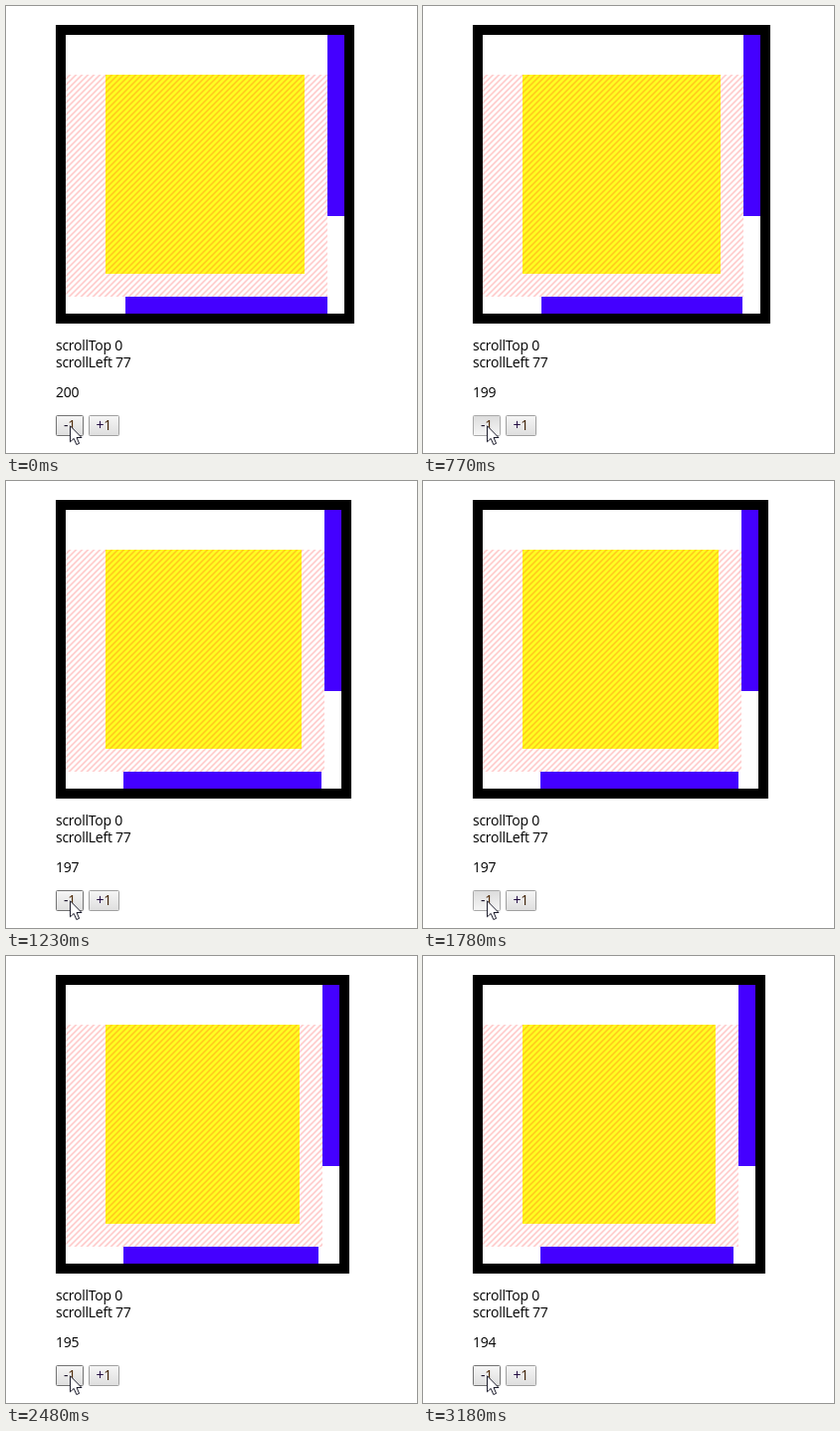
These frames come from a looping animation (413x449 px, 3.96 s). An HTML page:

```html
<!DOCTYPE html>
<html lang="en">
<head>
<meta charset="utf-8">
<title>Scroll box width</title>
<style>
html, body { margin: 0; width: 100%; height: 100%; overflow: hidden; background: #fff; }
svg { display: block; }
text { font: 14px "Open Sans", "Noto Sans", sans-serif; letter-spacing: -.25px; white-space: pre; }
.flat { shape-rendering: crispEdges; }
</style>
</head>
<body>
<svg width="413" height="449" viewBox="0 0 413 449">
  <defs>
    <pattern id="hatch" x="58.5" y="69" width="6" height="6" patternUnits="userSpaceOnUse">
      <path d="M-1 1L1 -1M-1 7L7 -1M5 7L7 5" stroke="#f00" stroke-opacity=".25" stroke-width="1.4"/>
    </pattern>
    <linearGradient id="up" x2="0" y2="1">
      <stop stop-color="#f6f6f6"/><stop offset="1" stop-color="#dedede"/>
    </linearGradient>
    <linearGradient id="down" x2="0" y2="1">
      <stop stop-color="#dcdcdc"/><stop offset="1" stop-color="#f6f6f6"/>
    </linearGradient>
  </defs>
  <g class="flat">
    <rect id="frame" x="50" y="19" height="300"/>
    <rect id="inner" x="60" y="29" height="280" fill="#fff"/>
    <rect id="content" x="100" y="69" height="200" fill="#ffff22"/>
    <rect id="vThumb" y="29" width="17" height="182" fill="#40f"/>
    <rect id="hThumb" y="292" height="17" fill="#40f"/>
  </g>
  <rect id="padding" x="60" y="69" height="223" fill="url(#hatch)"/>
  <text x="50" y="346">scrollTop 0</text>
  <text x="50" y="363">scrollLeft 77</text>
  <text id="count" x="50" y="393"></text>
  <rect id="minus" x="50.5" y="411.5" width="27" height="20" rx="1"/>
  <text x="58" y="426" fill="#181028">-<tspan fill="#4a2400">1</tspan></text>
  <rect x="83.5" y="411.5" width="30" height="20" rx="1" fill="url(#up)" stroke="#a0a0a0"/>
  <text x="90.5" y="426" fill="#200a40">+<tspan fill="#3a1c00">1</tspan></text>
  <path d="M64.5 421.8V437.8L68.2 434.4L70.8 440.5L73.6 439.4L71 433.5H76Z" fill="#fff" stroke="#1c1c2c"/>
</svg>
<script>
const LOOP = 3960, START = 200;
const SCROLL_WIDTH = 340, SCROLL_LEFT = 77;
// each click: [press, release] in ms
const clicks = [[220, 450], [770, 850], [1080, 1230], [1780, 1850], [2330, 2480], [3030, 3180]];
const el = id => document.getElementById(id);
const set = (id, attrs) => {
  for (const key in attrs) el(id).setAttribute(key, attrs[key]);
};

function draw(t) {
  const width = START - clicks.filter(c => t >= c[1]).length;
  const pressed = clicks.some(([press, release]) => t >= press && t < release);
  const track = width + 63;
  const thumb = Math.round(track * track / SCROLL_WIDTH);
  const left = Math.floor((track - thumb) * SCROLL_LEFT / (SCROLL_WIDTH - track));

  set('frame', { width: width + 100 });
  set('inner', { width: width + 80 });
  set('content', { width });
  set('padding', { width: track });
  set('vThumb', { x: 60 + track });
  set('hThumb', { x: 60 + left, width: thumb });
  set('minus', {
    fill: pressed ? 'url(#down)' : 'url(#up)',
    stroke: pressed ? '#a9a9a9' : '#747474'
  });
  el('count').textContent = width;
}

const origin = performance.now();
function tick() {
  draw((performance.now() - origin) % LOOP);
  requestAnimationFrame(tick);
}
tick();
</script>
</body>
</html>
```
